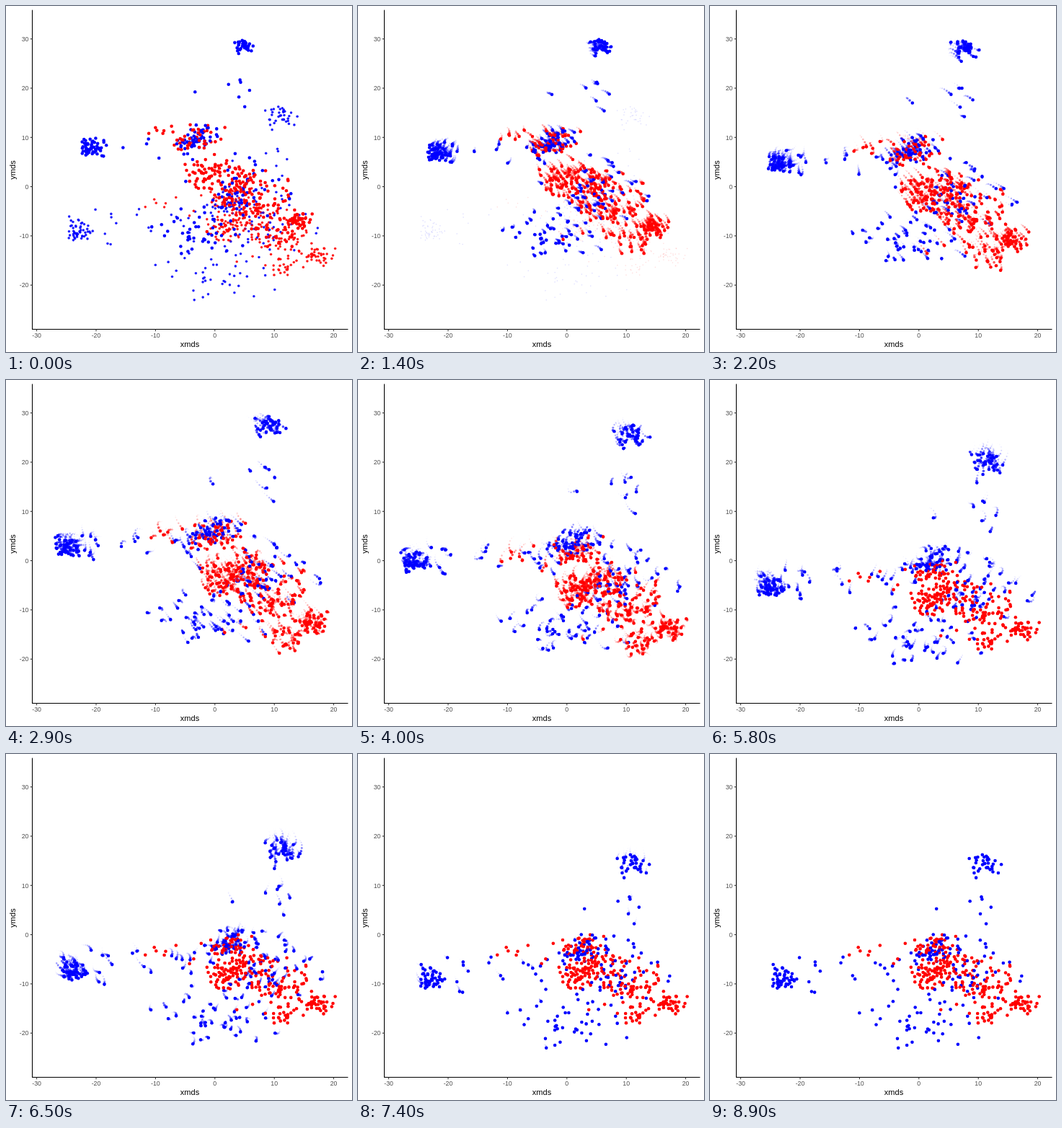
Recreate the animation shown at these times as an HTML page with a canvas. Size 480 px wide and 480 px high, loop 10000 ms.

```html
<!DOCTYPE html>
<html lang="en">
<head>
<meta charset="utf-8">
<title>MDS scatter</title>
<style>
html, body { margin: 0; width: 100%; height: 100%; overflow: hidden; background: #fff; }
svg, canvas { position: absolute; left: 0; top: 0; width: 480px; height: 480px; }
text { font-family: "Liberation Sans", Arial, sans-serif; }
</style>
</head>
<body>
<svg id="axes" viewBox="0 0 480 480"></svg>
<canvas id="dots" width="480" height="480"></canvas>
<script>
const FRAMES = 80, STEP = 100, LOOP = 10000, HOLD = 10, WAKE = 8;
const px = x => 289.8 + 8.24 * x;
const py = y => 250.6 - 6.83 * y;

let seed = 20;
function rand() {
  seed = (seed + 0x6D2B79F5) | 0;
  let t = Math.imul(seed ^ (seed >>> 15), 1 | seed);
  t = (t + Math.imul(t ^ (t >>> 7), 61 | t)) ^ t;
  return ((t ^ (t >>> 14)) >>> 0) / 4294967296;
}
// Bounded bell curve with unit deviation
const bell = () => (rand() + rand() + rand() - 1.5) * 2;

// Each cloud travels between two centres [x, y, spread];
// bend gives the sideways arc from the final place
const species = [
  {
    color: '#00f', steps: 61, bend: (x, y) => [.2 * x + .8, Math.max(0, .27 * y)],
    clouds: [
      { n: 46, from: [-20.9, 7.9, .8], to: [-22.8, -9, 1] },
      { n: 12, from: [-19.5, 8.2, 1.8], to: [-19, -7.8, 3.5] },
      { n: 34, from: [4.9, 28.7, .8], to: [11.2, 14.5, 1.4] },
      { n: 7, from: [2.2, 19, 2.5], to: [8.5, 5, 2.5] },
      { n: 50, from: [-3, 10, 1.5], to: [2.6, -3, 1.8] },
      { n: 10, from: [-7, 8, 2.8], to: [-8, -6.5, 3.2] },
      { n: 42, from: [-3, -9, 3.2], to: [0, -17, 4.2] },
      { n: 46, from: [4, 0, 3.8], to: [8.5, -7, 3.8] }
    ]
  },
  {
    color: '#f00', steps: 40, bend: (x, y) => [1, .3 * (y + 6)],
    clouds: [
      { n: 60, from: [-1.2, 2.6, 1.6], to: [2, -8.3, 1.4] },
      { n: 36, from: [-3, 9.3, 1.9], to: [2.5, -2.5, 1.5] },
      { n: 42, from: [4.8, .3, 2], to: [4.8, -6, 2] },
      { n: 92, from: [7, -2.5, 3.4], to: [10.8, -9.6, 2.9] },
      { n: 38, from: [14, -7, 1], to: [17.4, -14.3, 1.2] },
      { n: 18, from: [10, -9, 2], to: [10.6, -16.2, 1.1] },
      { n: 10, from: [-8, 10.7, 2], to: [-7.5, -4.3, 2.7] }
    ]
  }
];

function makePoint({ color, steps, bend }, { from, to }) {
  const ox = bell(), oy = bell() * .85;
  const place = ([x, y, spread]) => [x + ox * spread, y + oy * spread];
  const [x0, y0] = place(from), [x1, y1] = place(to);
  const [bx, by] = bend(x1, y1);
  const end = steps + rand() * 4 - 2;
  const phase = rand() * 2 * Math.PI, rate = .4 + rand() * .4;
  const path = Array.from({ length: FRAMES }, (_, k) => {
    const u = Math.min(1, k / end);
    const arc = Math.sin(Math.PI * u);
    const sway = .5 * Math.sqrt(arc);
    return [
      px(x0 + (x1 - x0) * u + bx * arc + sway * Math.sin(k * rate + phase)),
      py(y0 + (y1 - y0) * u + by * arc + sway * Math.cos(k * rate * 1.2 + phase))
    ];
  });
  return { color, path, order: rand() };
}

const points = species.flatMap(s => s.clouds.flatMap(c =>
  Array.from({ length: c.n }, () => makePoint(s, c))
)).sort((a, b) => a.order - b.order);

function drawAxes() {
  const line = (x1, y1, x2, y2, c) =>
    `<path d="M${x1} ${y1}L${x2} ${y2}" stroke="${c}" stroke-width="1.07"/>`;
  const label = (x, y, s, size, c, more) =>
    `<text x="${x}" y="${y}" font-size="${size}" fill="${c}" ${more}>${s}</text>`;
  let out = line(36.5, 5.5, 36.5, 449, '#000') + line(36, 448.5, 474.5, 448.5, '#000');
  for (let v = -30; v <= 20; v += 10)
    out += line(px(v), 448.5, px(v), 451.3, '#333') +
      label(px(v), 460, v, 8.8, '#4d4d4d', 'text-anchor="middle"');
  for (let v = -20; v <= 30; v += 10)
    out += line(33.7, py(v), 36.5, py(v), '#333') +
      label(31.5, py(v) + 3.2, v, 8.8, '#4d4d4d', 'text-anchor="end"');
  out += label(255, 472.6, 'xmds', 11, '#000', 'text-anchor="middle"');
  out += label(0, 0, 'ymds', 11, '#000',
    'text-anchor="middle" transform="translate(13.4 227.5) rotate(-90)"');
  document.getElementById('axes').innerHTML = out;
}

const ctx = document.getElementById('dots').getContext('2d');
let shown = -1;

function draw(t) {
  const step = Math.floor((t % LOOP) / STEP) - HOLD;
  const k = Math.max(0, Math.min(FRAMES - 1, step));
  if (k === shown) return;
  shown = k;
  ctx.clearRect(0, 0, 480, 480);
  // Older positions shrink and fade; the wake wraps around the loop
  for (let j = WAKE; j >= 0; j--) {
    const fade = (1 - j / (WAKE + 1)) ** 3;
    const at = (k - j + FRAMES) % FRAMES;
    ctx.globalAlpha = fade;
    for (const { color, path } of points) {
      ctx.fillStyle = color;
      ctx.beginPath();
      ctx.arc(...path[at], .75 + 1.53 * fade, 0, 2 * Math.PI);
      ctx.fill();
    }
  }
}

function tick() {
  draw(performance.now());
  requestAnimationFrame(tick);
}

drawAxes();
tick();
</script>
</body>
</html>
```
